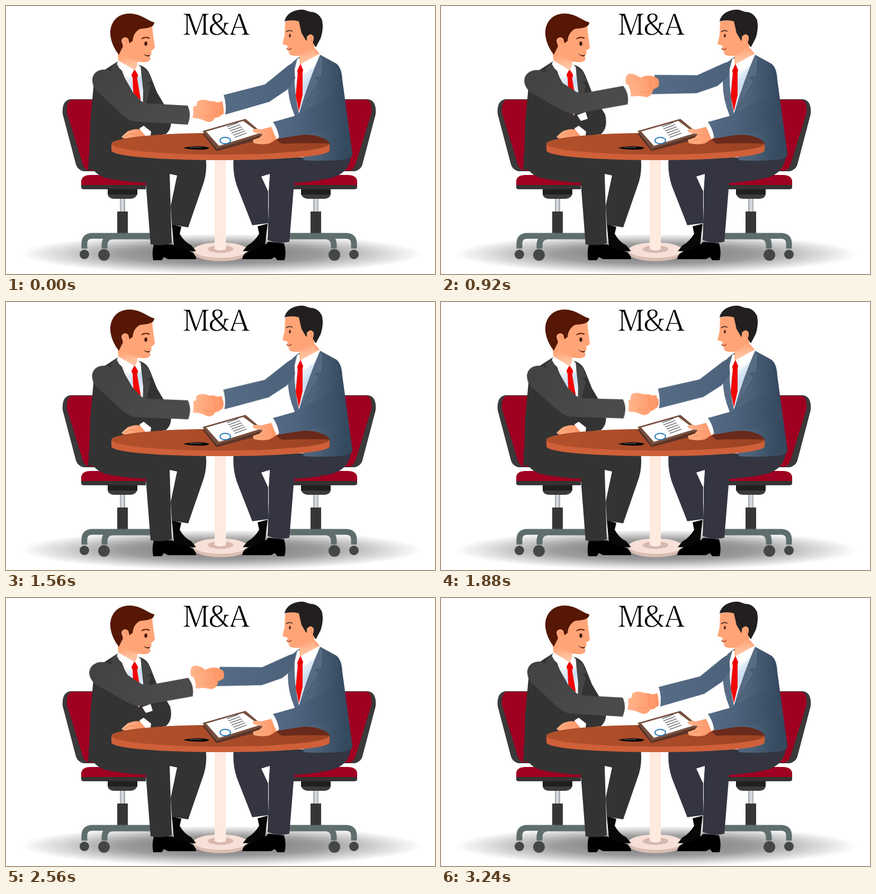
An HTML page without scripts that plays this animation: 810 by 506 pixels, repeating every 3.32 s.

```html
<!DOCTYPE html>
<html lang="en">
<head>
<meta charset="utf-8">
<title>M&amp;A handshake</title>
<style>
html, body { margin: 0; width: 100%; height: 100%; overflow: hidden; background: #fff; }
svg { display: block; width: 100vw; height: 100vh; }
/* the white outline slims the letters */
.title { font: 300 56px "Noto Serif", serif; letter-spacing: -3px; stroke: #fff; stroke-width: 1.3px; }
.arm { animation: 3320ms cubic-bezier(.37, 0, .63, 1) infinite; }
.left { transform-origin: 188px 148px; animation-name: lift-left; }
.right { transform-origin: 548px 112px; animation-name: lift-right; }
@keyframes lift-left {
  0%, 51.2%, 98.2%, 100% { transform: translate(0, 0) rotate(0deg); }
  26.2%, 75.9% { transform: translate(-4px, 0) rotate(-13.6deg); }
}
@keyframes lift-right {
  0%, 51.2%, 98.2%, 100% { transform: translate(0, 0) rotate(0deg); }
  26.2%, 75.9% { transform: translate(2px, -1px) rotate(15deg); }
}
</style>
</head>
<body>
<svg viewBox="0 0 810 506" preserveAspectRatio="none">
<defs>
  <radialGradient id="shade">
    <stop offset="0" stop-color="#747474"/><stop offset=".5" stop-color="#9c9c9c"/>
    <stop offset=".8" stop-color="#d8d8d8"/><stop offset="1" stop-color="#fff"/>
  </radialGradient>
  <linearGradient id="neck" x2=".2" y2="1">
    <stop offset="0" stop-color="#ff9c6c"/><stop offset="1" stop-color="#ffc9a8"/>
  </linearGradient>
  <linearGradient id="grip">
    <stop offset="0" stop-color="#ffb48c"/><stop offset="1" stop-color="#ff9463"/>
  </linearGradient>
  <linearGradient id="suit">
    <stop offset="0" stop-color="#5a6f88"/><stop offset=".4" stop-color="#4e627a"/>
    <stop offset=".8" stop-color="#384c62"/><stop offset="1" stop-color="#34485d"/>
  </linearGradient>
  <linearGradient id="cloth">
    <stop offset="0" stop-color="#566b85"/><stop offset=".45" stop-color="#4c617a"/><stop offset="1" stop-color="#394d63"/>
  </linearGradient>
  <linearGradient id="sleeve">
    <stop offset="0" stop-color="#566c86"/><stop offset="1" stop-color="#4c617a"/>
  </linearGradient>
  <linearGradient id="shirt" x2=".4" y2="1">
    <stop offset=".25" stop-color="#fff"/><stop offset=".6" stop-color="#c9dcf1"/><stop offset="1" stop-color="#fff"/>
  </linearGradient>
  <linearGradient id="grey" x2="1" y2=".5">
    <stop offset="0" stop-color="#424242"/><stop offset="1" stop-color="#4b4b4b"/>
  </linearGradient>
  <linearGradient id="wood">
    <stop offset="0" stop-color="#b2502b"/><stop offset=".6" stop-color="#a84a28"/><stop offset="1" stop-color="#9a4223"/>
  </linearGradient>
  <linearGradient id="steel">
    <stop offset="0" stop-color="#a5a9ad"/><stop offset=".5" stop-color="#e1e4e8"/><stop offset="1" stop-color="#9a9ea2"/>
  </linearGradient>
  <g id="chair">
    <path d="M122 176H168V312H146Q135 309 132 299L107 204Q105 178 122 176Z" fill="#3a3a3a"/>
    <path d="M125 177H170V311H157Q148 309 145 299L115 202Q113 179 125 177Z" fill="#9f0021"/>
    <path d="M142 339V330Q144 319 160 319H266V339Z" fill="#9f0021"/>
    <path d="M142 338H264V346H147Q142 346 142 342Z" fill="#343434"/>
    <path d="M192 346H248V354Q246 363 236 364H203Q192 363 192 354Z" fill="#3b3b3b"/>
    <path d="M192 346H248V356H192Z" fill="#211f20"/>
    <path d="M215 364H225V390H215Z" fill="url(#steel)"/>
    <path d="M210 388H230V430H210Z" fill="#363636"/>
    <path d="M148 458V447Q149 434 163 434H272M186 458V450Q187 436 201 435H272" fill="none" stroke="#5f6d6d" stroke-width="11"/>
    <g fill="#454747"><circle cx="148" cy="469" r="9"/><circle cx="185" cy="470" r="11"/></g>
  </g>
  <path id="line" d="M417 228L439 220" stroke="#444" stroke-width="1.3"/>
</defs>

<rect width="810" height="506" fill="#fff"/>
<ellipse cx="407" cy="468" rx="380" ry="38" fill="url(#shade)"/>
<text class="title" x="395" y="55" text-anchor="middle">M&amp;A</text>

<use href="#chair"/>
<use href="#chair" transform="translate(805) scale(-1 1)"/>

<!-- table leg -->
<path d="M354 461V466C357 487 453 487 456 466V461Z" fill="#d9bdb3"/>
<ellipse cx="405" cy="461" rx="51" ry="14.5" fill="#f7e0d7"/>
<ellipse cx="405" cy="459" rx="24" ry="7" fill="#d8b9ad"/>
<path d="M394 285H415V459Q405 464 394 459Z" fill="#ffeadf"/>

<!-- left man, legs -->
<path d="M313 412L331 417L328 430Q336 445 350 452L359 463L318 462Z" fill="#070707"/>
<path d="M279 450H314Q324 459 344 462Q358 466 359 478H306L298 474L294 480H278Q275 466 279 450Z" fill="#000"/>
<path d="M155 285H377Q381 314 371 340L344 418L313 413L311 377L323 320L309 317L313 448Q294 454 273 450L264 334Q215 331 186 324Q159 314 155 285Z" fill="#333"/>

<!-- right man, legs -->
<path d="M494 411L475 416L478 430Q469 445 456 452L447 463L488 462Z" fill="#070707"/>
<path d="M495 445L525 448Q530 463 526 480H512L508 474L500 478H446Q447 466 462 462Q484 459 495 445Z" fill="#000"/>
<path d="M430 286H651Q647 313 620 323Q590 331 544 334L535 445Q514 450 494 442L496 377V348L498 317L482 322L495 350V410L465 414L436 340Q427 313 430 286Z" fill="#343541"/>
<path d="M498 318L483 322L496 348Z" fill="#fff"/>

<!-- left man, body -->
<path d="M166 143Q166 130 181 124L212 104L254 112Q267 117 272 130L285 163L310 205Q316 230 302 242L270 246L238 300L155 310Q158 270 159 220Z" fill="#333"/>
<path d="M212 104L238 172L250 207L264 187L256 116L246 108Z" fill="url(#shirt)"/>
<path d="M239 134L247 133L254 174L250 207L241 177Z" fill="#f30505"/>
<path d="M244 119L250 129L247 138H240L236 128Z" fill="#e00"/>
<path d="M212 103L208 112L234 136L242 120ZM247 109L243 120L252 134L257 119Z" fill="#fff"/>
<path d="M208 107L198 118L205 138L218 139L210 146L250 207L238 160Z" fill="#444"/>
<path d="M254 113L270 128L275 142L266 144L273 150L264 190L258 205L259 160Z" fill="#454545"/>
<path d="M257 206L273 200L277 213L264 217Z" fill="#fff"/>
<path d="M252 231L260 226L274 237L273 245H257Z" fill="#fff"/>
<path d="M218 247L229 237Q241 231 253 233L264 246L250 250H222Z" fill="url(#grip)"/>
<path d="M222 248L234 241L246 242" fill="none" stroke="#e98352"/>

<!-- left man, head -->
<path d="M211 88L218 70L238 42L276 36Q278 60 281 76Q281 82 274 84L275 90L271 94L273 100Q270 107 258 106L248 105L247 112L243 121L212 102Z" fill="#ffa477"/>
<path d="M212 90L248 104L246 112L243 120L212 103Z" fill="url(#neck)"/>
<path d="M213 92C201 77 194 56 198 41C204 18 224 12 242 15C260 19 267 27 280 31C280 40 268 42 254 43C246 46 240 54 239 66L232 71L229 61Q221 57 218 65L221 76Z" fill="#561704"/>
<path d="M218 65Q224 55 231 62L234 74Q228 83 221 76Z" fill="#ffa477"/>
<path d="M223 65Q229 63 228 72" fill="none" stroke="#e98352"/>
<path d="M256 62Q263 57 271 61" fill="none" stroke="#561704" stroke-width="2"/>
<ellipse cx="264" cy="71" rx="2.7" ry="4" fill="#3a1509"/>
<path d="M259 90Q266 95 272 92L271 95Q264 96 259 90Z" fill="#54180c"/>

<!-- right man, body -->
<path d="M541 106L552 97L593 92L624 109Q634 117 635 139L654 279Q654 288 638 290Q600 294 562 291L557 243L545 207Q532 176 532 145Z" fill="url(#suit)"/>
<path d="M550 100L545 120L545 170L553 203L588 124L590 95Z" fill="url(#shirt)"/>
<path d="M551 126H560L560 168L553 199L547 170Z" fill="#f30505"/>
<path d="M556 108L562 118L559 128H551L549 118Z" fill="#e00"/>
<path d="M552 97L546 116L549 124L556 109ZM592 89L556 109L564 128L594 103Z" fill="#fff"/>
<path d="M592 94L598 101L596 132L583 135L591 142L553 205Q566 156 592 94Z" fill="#576b83"/>
<path d="M598 101L596 132L583 135L591 142L553 205" fill="none" stroke="#3f536a"/>
<path d="M548 104L534 121L530 140L541 141L535 149Q539 181 553 204Q544 165 544 119Z" fill="#596e87"/>

<!-- right man, head -->
<path d="M527 30L550 22L586 54L582 78L592 90L555 110L554 94Q541 95 535 91L533 83L529 81L532 77L530 74L522 72L526 55Z" fill="#ffa477"/>
<path d="M554 93Q567 91 576 76L588 92L557 108Z" fill="url(#neck)"/>
<path d="M526 29C529 14 544 6 562 7L574 11Q590 11 597 27Q600 44 594 61L585 78L579 69L580 58Q575 50 570 58L567 66L558 51L553 29Q541 25 526 29Z" fill="#231f20"/>
<path d="M568 58Q576 49 581 58Q581 73 573 74Q567 70 568 58Z" fill="#ffa477"/>
<path d="M573 59Q578 57 577 67" fill="none" stroke="#e98352"/>
<path d="M529 49Q535 44 541 48" fill="none" stroke="#231f20" stroke-width="1.5"/>
<ellipse cx="536" cy="56" rx="1.6" ry="3.2" fill="#3b1c12"/>
<path d="M530 81Q534 84 539 80" fill="none" stroke="#8a3520" stroke-width="1.5"/>

<!-- table top -->
<path d="M199 261V273C207 297 603 297 611 273V260Z" fill="#cf6039"/>
<ellipse cx="405" cy="260" rx="206" ry="20.5" fill="url(#wood)"/>
<path d="M510 252Q548 240 581 244Q608 250 611 260Q580 258 520 260Z" fill="#692a1b"/>
<path d="M334 268L344 266Q367 263 383 267Q385 270 374 271Q352 272 334 268Z" fill="#080808"/>
<path d="M347 267H369" stroke="#777"/>

<!-- clipboard -->
<path d="M371 241L397 274L468 255L486 246L452 218Z" fill="#5a3427"/>
<path d="M371 236L452 213L487 242L398 270Z" fill="#76503f"/>
<path d="M378 237L448 217L479 240L402 264Z" fill="#fff"/>
<ellipse cx="414" cy="254" rx="10" ry="6" fill="none" stroke="#2176b5" stroke-width="2"/>
<use href="#line"/><use href="#line" x="3" y="4"/><use href="#line" x="6" y="8"/>
<use href="#line" x="9" y="12"/><use href="#line" x="12" y="16"/><use href="#line" x="15" y="20"/>

<!-- holding hand and sleeve -->
<path d="M465 234Q473 230 482 233L501 228L514 249L499 259Q487 263 468 259L466 253L478 249L485 242L468 239Z" fill="url(#grip)"/>
<path d="M467 253L481 248M470 257L486 251" stroke="#e98352"/>
<path d="M499 224L507 219L517 247L511 252Z" fill="#fff"/>
<path d="M504 219L547 207Q582 187 608 174L628 205Q624 228 599 237L516 250Q513 231 504 219Z" fill="url(#cloth)"/>

<!-- handshake -->
<g class="arm right">
  <path d="M412 179L395 183L380 178Q366 175 361 181Q357 192 367 203L386 212L401 210L413 202Z" fill="url(#grip)"/>
  <path d="M405 171L414 168L417 204L411 207Q412 185 405 171Z" fill="#fff"/>
  <path d="M543 106L532 113L489 148L411 168Q417 186 414 205L497 181L531 158L546 137Z" fill="url(#sleeve)"/>
</g>
<g class="arm left">
  <path d="M343 188L352 187Q357 200 351 214L343 219Z" fill="#fff"/>
  <path d="M353 190L366 187L381 180Q393 178 403 184L410 190Q412 199 407 205L396 208Q392 220 381 219L366 213L352 211Q355 200 353 190Z" fill="url(#grip)"/>
  <path d="M389 183Q397 190 392 201L396 208M371 205Q380 211 389 208" fill="none" stroke="#f58a59"/>
  <path d="M163 137Q166 122 183 120Q197 120 207 129L253 177Q258 183 268 184L343 188Q351 205 343 224L242 218Q232 216 219 205L170 159Q162 149 163 137Z" fill="url(#grey)"/>
</g>
</svg>
</body>
</html>
```
